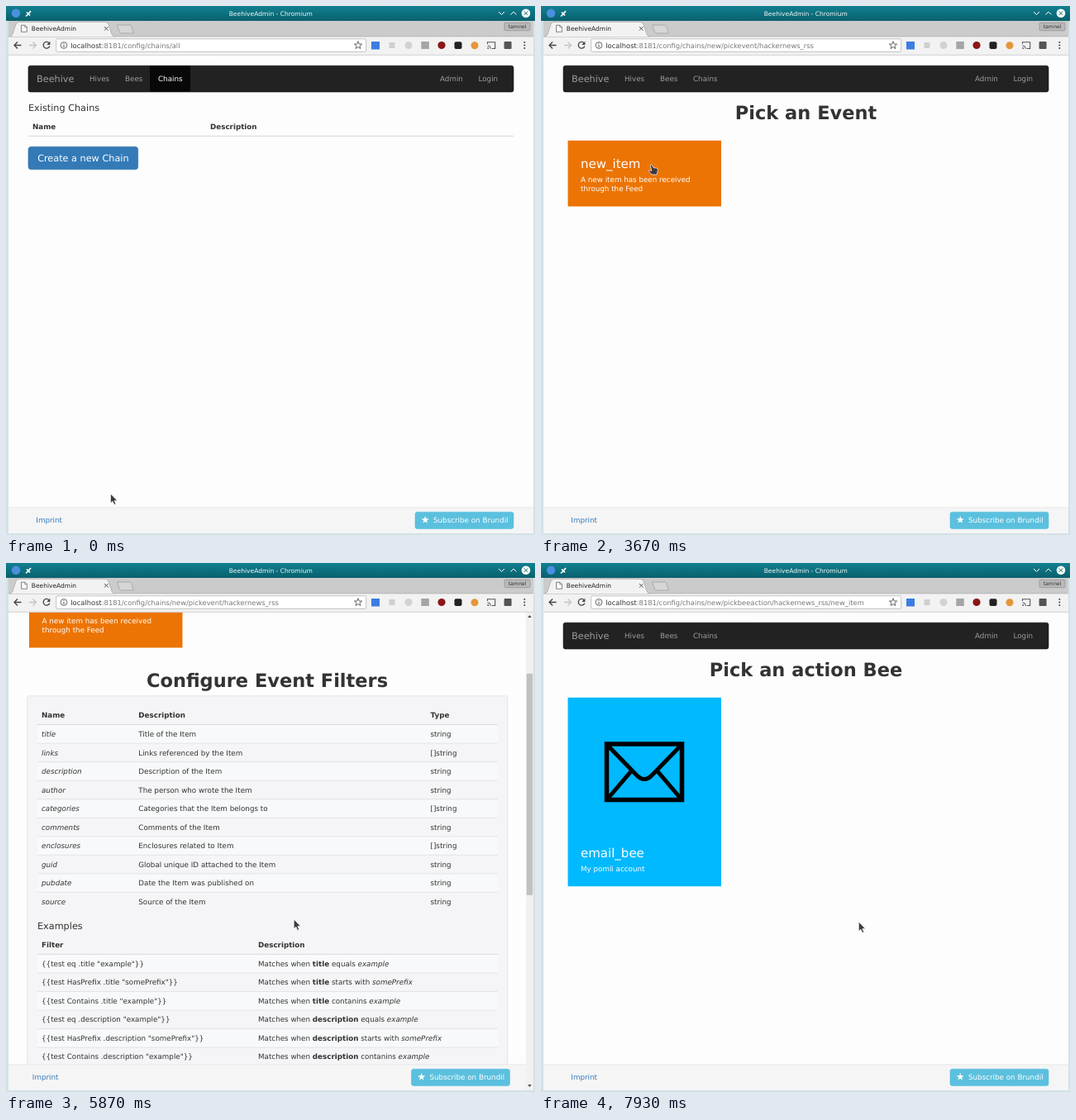
Recreate the animation shown at these times as an HTML page. Size 640 by 640 pixels, loop 8 s.

```html
<!DOCTYPE html>
<html lang="en">
<head>
<meta charset="utf-8">
<title>BeehiveAdmin</title>
<style>
  html, body { margin: 0; width: 100%; height: 100%; overflow: hidden; background: #fdfdfe; }
  svg { display: block; width: 100vw; height: 100vh; }
  text { font-family: "DejaVu Sans", sans-serif; fill: #333; white-space: pre; text-rendering: geometricPrecision; }
</style>
</head>
<body>
<svg id="stage" viewBox="0 0 640 640"></svg>
<script>
const BODY = 8.76, LARGE = 11.26, CARD = 15, HEAD = 22.5;
const BLUE = '#337ab7', BLUE_HOVER = '#286090', ORANGE = '#ec7404';
const LOOP = 8000, FRAME = 1000 / 15;

const text = (x, y, s, size = BODY, fill = '#333', attrs = '') =>
  `<text x="${x}" y="${y}" font-size="${size}" style="fill:${fill}" ${attrs}>${s}</text>`;
const rect = (x, y, w, h, fill, attrs = '') =>
  `<rect x="${x}" y="${y}" width="${w}" height="${h}" fill="${fill}" ${attrs}/>`;
const line = (d, stroke, width = 1, attrs = '') =>
  `<path d="${d}" fill="none" stroke="${stroke}" stroke-width="${width}" ${attrs}/>`;
const dot = (x, y, r, fill) => `<circle cx="${x}" cy="${y}" r="${r}" fill="${fill}"/>`;
const bold = 'font-weight="700"', italic = 'font-style="italic"', middle = 'text-anchor="middle"';
const b = s => `<tspan ${bold}>${s}</tspan>`;
const i = s => `<tspan ${italic}>${s}</tspan>`;

const star = (cx, cy, r, attrs) => {
  const points = Array.from({ length: 10 }, (_, k) => {
    const a = (k / 5 - 0.5) * Math.PI, d = k % 2 ? r * 0.42 : r;
    return (cx + d * Math.cos(a)).toFixed(2) + ',' + (cy + d * Math.sin(a)).toFixed(2);
  });
  return `<polygon points="${points.join(' ')}" ${attrs}/>`;
};

const button = (x, y, w, h, label, id = '') =>
  rect(x, y, w, h, BLUE, `rx="3.6" stroke="#2e6da4" stroke-width=".6" id="${id}"`) +
  text(x + w / 2, y + h / 2 + 4.1, label, LARGE, '#fff', middle);

const heading = (s, x = 320.5, y = 136.7) => text(x, y, s, HEAD, '#333', `${bold} ${middle}`);

function navbar(active) {
  const items = [['Hives', 101], ['Bees', 144], ['Chains', 184], ['Admin', 525], ['Login', 571.5]];
  return rect(27, 72.2, 587, 31.8, '#222', 'rx="2.6" stroke="#080808" stroke-width=".6"') +
    (active ? rect(174, 72.5, 49, 31, '#080808') : '') +
    text(37, 92, 'Beehive', LARGE, '#9d9d9d') +
    items.map(([s, x]) => text(x, 91.2, s, BODY, s === active ? '#fff' : '#9d9d9d')).join('');
}

const card = (color, height, title, titleY, lines) =>
  rect(32.5, 162.8, 185.5, height, color) + text(48, titleY, title, CARD, '#fff') +
  lines.map((s, k) => text(48, titleY + 16.8 + k * 11.3, s, BODY, '#fff')).join('');

const feedIcon = dot(81.5, 296, 16.4, '#fff') +
  [67.7, 107.5].map(r => line(`M65.3 ${312.5 - r}a${r} ${r} 0 0 1 ${r} ${r}`, '#fff', 23.4)).join('');

const mailIcon = rect(79.5, 219, 91, 67.5, 'none', 'stroke="#000" stroke-width="5.5"') +
  line('M80 220L115 256Q125 267 135 256L170 220M80 286L109 252M170 286L141 252', '#000', 5);

// One table with a header, ruled rows and alternating stripes.
function table(headY, columns, titles, rows) {
  const ROW = 22.53, top = headY + 11.6;
  return titles.map((s, c) => text(columns[c], headY + 3.1, s, BODY, '#333', bold)).join('') +
    line(`M38 ${top}H595`, '#ddd', 1.3) +
    rows.map((row, r) => {
      const y = top + r * ROW;
      return (r % 2 ? '' : rect(38, y + .5, 557, ROW - .5, '#f8f9fa')) +
        (r ? line(`M38 ${y}H595`, '#ddd', .7) : '') +
        row.map((s, c) => text(columns[c], y + 14.4, s)).join('');
    }).join('');
}

const fields = [
  ['title', 'Title of the Item'], ['links', 'Links referenced by the Item', '[]string'],
  ['description', 'Description of the Item'], ['author', 'The person who wrote the Item'],
  ['categories', 'Categories that the Item belongs to', '[]string'], ['comments', 'Comments of the Item'],
  ['enclosures', 'Enclosures related to Item', '[]string'], ['guid', 'Global unique ID attached to the Item'],
  ['pubdate', 'Date the Item was published on'], ['source', 'Source of the Item']
].map(([name, about, type = 'string']) => [i(name), about, type]);

const tests = [['eq', 'equals', 'example'], ['HasPrefix', 'starts with', 'somePrefix'], ['Contains', 'contanins', 'example']];
const examples = ['title', 'description', 'author', 'comments', 'guid', 'pubdate', 'source'].flatMap(name =>
  tests.map(([op, verb, value]) =>
    [`{{test ${op} .${name} "${value}"}}`, `Matches when ${b(name)} ${verb} ${i(value)}`]));

const filters = heading('Configure Event Filters', 316, 290.3) +
  rect(25.8, 300.8, 581, 866, '#f5f4f6', 'rx="2.6" stroke="#e0e0e2" stroke-width=".8"') +
  table(324, [43, 160.3, 513.5], ['Name', 'Description', 'Type'], fields) +
  text(38, 583.2, 'Examples', LARGE) +
  table(601.8, [43, 305], ['Filter', 'Description'], examples) +
  text(38, 1106, `Find more examples in our <tspan style="fill:${BLUE}">Tips</tspan>.`) +
  button(277.8, 1127, 76.4, 27.3, 'Add Filter') +
  button(426.3, 1201.2, 182.7, 27.6, 'Continue', 'continue');

const pickEvent = navbar() + heading('Pick an Event') +
  card(ORANGE, 79.7, 'new_item', 196.2, ['A new item has been received', 'through the Feed']);

const ROOT = 'localhost:8181';
const pages = [
  { from: 0, path: '/config/chains/all', body: navbar('Chains') +
    text(27, 127, 'Existing Chains', LARGE) + text(32, 148.8, 'Name', BODY, '#333', bold) +
    text(247, 148.8, 'Description', BODY, '#333', bold) + line('M27 157.3H614', '#ddd', 1.3) +
    button(27, 170.3, 132.7, 27.5, 'Create a new Chain', 'create') },
  { from: 1400, path: '/config/chains/new/pickbee', body: navbar() + heading('Pick an event Bee') +
    card(ORANGE, 228.4, 'fernampost_rss', 356.4, ['Fernam Post RSS Feed']) + feedIcon },
  { from: 2670, path: '/config/chains/new/pickevent/hackernews_rss', body: pickEvent },
  { from: 4400, path: '/config/chains/new/pickevent/hackernews_rss', scrolls: true,
    body: `<g transform="translate(-4.5)">${pickEvent}</g>` + filters },
  { from: 7800, path: '/config/chains/new/pickbeeaction/hackernews_rss/new_item', body: navbar() +
    heading('Pick an action Bee') + card('#00b9ff', 228.4, 'email_bee', 356.4, ['My pomli account']) + mailIcon }
];

const titleBar = rect(0, 0, 640, 18, 'url(#teal)') + dot(12, 8.7, 5.2, '#4a8fe0') +
  line('M24 12.5L27 9.5M25 7.5L29 11.5M27.5 8.8L30 6.2', '#fff', 1.7) +
  text(320.3, 12, 'BeehiveAdmin - Chromium', 7.55, '#f4f8f8', middle) +
  line('M596 7L599.5 10.5L603 7M610.5 10.5L614 7L617.5 10.5', '#fff', 1) +
  dot(629, 8.7, 5.3, '#fcfcfc') + line('M626.7 6.4L631.3 11M631.3 6.4L626.7 11', '#176b76', 1);

const tabStrip = rect(0, 18, 640, 19.5, '#cbcbcc') + line('M3 37H637', '#a8a8a8', .8) +
  '<path d="M4 37.5Q7 37 8 34L12 22Q13 19.3 16 19.3H120Q123 19.3 124 22L128 34Q129 37 132 37.5Z" fill="#f2f2f2" stroke="#a2a2a2" stroke-width=".7"/>' +
  '<path d="M18.5 23.3H23L25.3 25.6V31.3H18.5Z" fill="#fff" stroke="#666" stroke-width=".8"/>' +
  line('M22.8 23.3V25.8H25.3', '#666', .7) + text(30.8, 30, 'BeehiveAdmin', 7.5, '#222') +
  line('M119 25L123.6 29.6M123.6 25L119 29.6', '#555', 1) +
  '<path d="M134.5 23H149.5Q151 23 151.6 24.5L154.6 33H140Q138 33 137.3 31.2Z" fill="#d6d6d6" stroke="#a0a0a0" stroke-width=".8"/>' +
  rect(603, 20.3, 31, 9.4, '#b9b9ba', 'rx="1.2" stroke="#8f8f90" stroke-width=".7"') +
  text(618.5, 27.2, 'tamnel', 6.2, '#333', middle);

const extensions = rect(442, 43, 10, 9.5, '#3b7de0') + rect(463.5, 44, 7, 7, '#cfcfcf') +
  dot(487, 47.5, 4.5, '#d2d2d2') + rect(502.3, 43, 9.5, 9, '#a5a5a5') + dot(527, 47.5, 4.6, '#8b1616') +
  rect(542.5, 43.3, 9, 8.6, '#222', 'rx="2"') + dot(567, 47.7, 4.5, '#e4963a') +
  line('M582.5 46V43.7H591.7V51.5H587.7M582.5 48A4 4 0 0 1 586.3 51.7', '#555', 1.1) + dot(583.2, 51, .9, '#555') +
  rect(602.6, 43, 9, 9, '#555', 'rx="1"') + [44, 47.5, 51].map(y => dot(627.3, y, 1, '#444')).join('');

const toolbar = rect(0, 37.5, 640, 22, '#f2f2f2') + line('M0 59.3H640', '#c4c4c4', .7) +
  line('M18.5 47.5H10.3M14 43.5L10 47.5L14 51.5', '#444', 1.3) +
  line('M28 47.5H36.2M32.5 43.5L36.5 47.5L32.5 51.5', '#c4c4c4', 1.3) +
  line('M52 44.7A3.9 3.9 0 1 0 52.8 48.5', '#444', 1.3) + '<path d="M53.4 42.8V46.9H49.3Z" fill="#444"/>' +
  rect(60.7, 39.8, 375, 15.6, '#fff', 'rx="1.6" stroke="#b4b4b4" stroke-width=".8"') +
  '<circle cx="70" cy="47.5" r="3.9" fill="none" stroke="#555" stroke-width=".9"/>' +
  line('M70 47V50M70 45V46', '#555', 1) + text(78.3, 50.6, '', 8.36, '#777', 'id="address"') +
  star(426, 47.6, 4.9, 'fill="none" stroke="#555" stroke-width=".9"') + extensions;

const footer = rect(3, 606.8, 635, 31.2, '#f5f5f6') + line('M3 606.8H638', '#e4e4e6', .8) + '<g id="footer">' +
  text(36.3, 625, 'Imprint', BODY, BLUE) +
  rect(495, 612.2, 119, 20.2, '#5bc0de', 'rx="2.6" stroke="#46b8da" stroke-width=".5"') +
  star(507.2, 621.8, 4.7, 'fill="#fff"') + text(517, 625, 'Subscribe on Brundil', BODY, '#fff') + '</g>';

const scrollbar = '<g id="scrollbar">' + rect(629, 59.5, 9, 578.5, '#f1f1f1') +
  '<path d="M631.2 66L633.5 63L635.8 66ZM631.2 631L633.5 634L635.8 631Z" fill="#505050"/>' +
  rect(629.8, 69, 7.4, 268, '#c1c1c1', 'id="thumb"') + '</g>';

const borders = rect(0, 18, 3, 622, '#d3e2e6') + rect(638, 18, 2, 622, '#d3e2e6') + rect(0, 638, 640, 2, '#d3e2e6');

const outline = 'stroke="#fff" stroke-width=".7" stroke-linejoin="round"';
const cursors = '<g id="cursor">' +
  `<path id="arrow" d="M0 0V11.6L2.6 9.2L4.4 13.4L6.4 12.5L4.6 8.4H8.2Z" fill="#3b3b40" ${outline}/>` +
  `<path id="hand" d="M-.6 1Q.4 -.4 1.5 1L3.4 4.2L7 4.6Q8.6 5 8.6 7L8 9.8L7.4 12.5H1.2L-2.4 8.2Q-2.7 6.8 -1 7.2L1 8Z" fill="#3b3b40" ${outline}/>` +
  `<g id="beam">${line('M-1.8 -4.7Q0 -4.7 0 -3.5Q0 -4.7 1.8 -4.7M0 -3.5V3.5M-1.8 4.7Q0 4.7 0 3.5Q0 4.7 1.8 4.7', '#444', .9)}</g></g>`;

const stage = document.getElementById('stage');
stage.innerHTML = '<defs><clipPath id="view"><rect x="3" y="59.6" width="635" height="547.4"/></clipPath>' +
  '<linearGradient id="teal" x2="0" y2="1"><stop stop-color="#128090"/><stop offset="1" stop-color="#07606c"/></linearGradient></defs>' +
  rect(0, 0, 640, 640, '#fdfdfe') +
  '<g clip-path="url(#view)">' + pages.map((p, k) => `<g id="page${k}">${p.body}</g>`).join('') + '</g>' +
  footer + scrollbar + titleBar + tabStrip + toolbar + borders + cursors;

const el = id => document.getElementById(id);
const show = (id, on) => el(id).setAttribute('display', on ? 'inline' : 'none');

const pointer = [
  [0, 126.5, 590], [200, 126.5, 590], [1070, 128, 183], [1400, 127, 186], [1730, 124, 190], [1800, 124, 190],
  [2330, 137.2, 272.3], [3070, 137.2, 272.3], [3670, 132.8, 191.5], [4200, 132.8, 191.5], [4530, 140, 196],
  [5470, 331.3, 429], [6270, 365.2, 433], [6730, 459.5, 503], [7270, 490, 592], [7530, 490, 588],
  [7930, 384.3, 434], [LOOP, 384.3, 434]
];
const shapes = [[0, 'arrow'], [1000, 'hand'], [2670, 'arrow'], [3400, 'hand'], [4800, 'arrow'],
  [6000, 'beam'], [6400, 'arrow'], [7130, 'hand'], [7600, 'arrow']];
const scrollSteps = [[0, 0], [5400, 0], [5470, 7], [5870, 140], [6270, 334], [6730, 629], [LOOP, 629]];

const ease = u => u * u * (3 - 2 * u);
const linear = u => u;
function track(keys, t, curve) {
  const n = keys.findIndex(k => k[0] > t), from = keys[n - 1], to = keys[n];
  const u = curve((t - from[0]) / (to[0] - from[0]));
  return from.slice(1).map((v, k) => v + (to[k + 1] - v) * u);
}
const latest = (list, t, time) => list.filter(item => time(item) <= t).pop();

function render(time) {
  const t = Math.min(LOOP - 1, Math.round(Math.floor((time % LOOP + 3.4) / FRAME) * FRAME / 10) * 10);
  const page = latest(pages, t, p => p.from);
  const index = pages.indexOf(page);
  pages.forEach((p, k) => show('page' + k, k === index));
  el('address').innerHTML = `<tspan fill="#333" style="fill:#333">${ROOT.split(':')[0]}</tspan>:8181${page.path}`;

  const [scroll] = track(scrollSteps, t, linear);
  el('page3').setAttribute('transform', `translate(0 ${-scroll})`);
  el('thumb').setAttribute('y', 69 + scroll * 0.463);
  show('scrollbar', page.scrolls);
  el('footer').setAttribute('transform', `translate(${page.scrolls ? -4.5 : 0})`);

  const [x, y] = track(pointer, t, ease);
  const shape = latest(shapes, t, s => s[0])[1];
  el('cursor').setAttribute('transform', `translate(${x} ${y})`);
  ['arrow', 'hand', 'beam'].forEach(s => show(s, s === shape));
  el('create').setAttribute('fill', t >= 1130 ? BLUE_HOVER : BLUE);
  el('continue').setAttribute('fill', t >= 7130 && shape === 'hand' ? BLUE_HOVER : BLUE);
}

const start = performance.now();
function tick(now) {
  render(Math.max(0, now - start));
  requestAnimationFrame(tick);
}
render(0);
requestAnimationFrame(tick);
</script>
</body>
</html>
```
